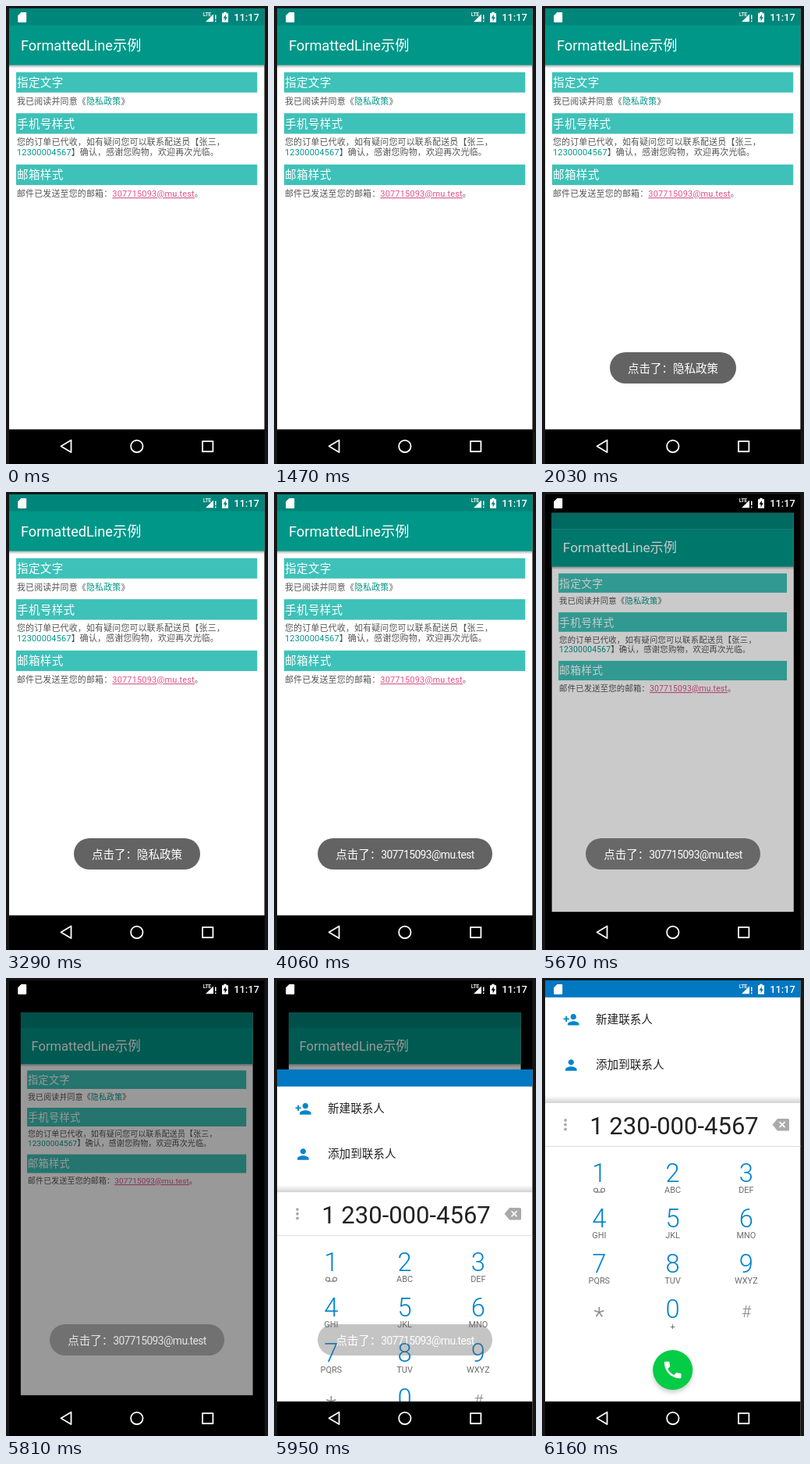
An HTML page for the animation above (6.44 s loop, 336x586 px).

```html
<!DOCTYPE html>
<html lang="zh-CN">
<head>
<meta charset="utf-8">
<title>Text styles</title>
<style>
  html, body { margin: 0; width: 100%; height: 100%; overflow: hidden; background: #161616; }
  svg { display: block; width: 336px; height: 586px; }
  text { font-family: Roboto, "Noto Sans CJK SC", "Noto Sans CJK", sans-serif; text-spacing-trim: space-all; white-space: pre; }
  .title { font-size: 18.2px; fill: #fff; }
  .heading { font-size: 14.58px; letter-spacing: .3px; fill: #fff; }
  .body { font-size: 10.93px; letter-spacing: .2px; fill: #555; }
  .link { fill: #009688; }
  .mail { fill: #db5288; text-decoration: underline .6px; text-underline-offset: 1px; text-decoration-skip-ink: none; }
  .toast text { font-size: 14.5px; fill: #fff; text-anchor: middle; }
  .toast rect { fill: #636363; }
  .toast .address { font-size: 13.8px; letter-spacing: -.55px; }
  .action { font-size: 14.58px; fill: #222; }
  .blue { fill: #0284cc; }
  .number { font-size: 31px; fill: #222; text-anchor: middle; }
  .digit { font-size: 32.8px; font-weight: 300; fill: #0284cc; text-anchor: middle; }
  .letters { font-size: 10.9px; fill: #6c6c6c; text-anchor: middle; }
  .symbol { font-weight: 300; fill: #888; text-anchor: middle; }
  .clock { font-size: 12.75px; font-weight: 500; fill: #fff; }
</style>
</head>
<body>
<svg viewBox="0 0 336 586">
  <defs>
    <linearGradient id="below" x2="0" y2="1">
      <stop stop-color="#000" stop-opacity=".3"/><stop offset="1" stop-color="#000" stop-opacity="0"/>
    </linearGradient>
    <linearGradient id="above" x2="0" y2="1">
      <stop stop-color="#000" stop-opacity="0"/><stop offset="1" stop-color="#000" stop-opacity=".18"/>
    </linearGradient>
    <filter id="soft" x="-30%" y="-30%" width="160%" height="160%"><feGaussianBlur stdDeviation="3"/></filter>
  </defs>
  <rect width="336" height="586" fill="#161616"/>
  <rect x="4" y="3" width="327.4" height="583"/>

  <g id="app">
    <rect x="4" y="3" width="327.4" height="538.8" fill="#fff"/>
    <rect x="4" y="3" width="327.4" height="22" fill="#00857a"/>
    <rect x="4" y="24.7" width="327.4" height="51" fill="#009788"/>
    <rect x="4" y="75.7" width="327.4" height="4" fill="url(#below)"/>
    <text class="title" x="19" y="56.5">FormattedLine示例</text>
    <g fill="#3ec1b8">
      <rect x="13" y="84.7" width="309.2" height="26"/>
      <rect x="13" y="137.2" width="309.2" height="26.3"/>
      <rect x="13" y="202.8" width="309.2" height="26.3"/>
    </g>
    <text class="heading" x="14" y="103">指定文字</text>
    <text class="heading" x="14" y="155.8">手机号样式</text>
    <text class="heading" x="14" y="221.2">邮箱样式</text>
    <text class="body" x="14" y="126">我已阅读并同意《<tspan class="link">隐私政策</tspan>》</text>
    <text class="body" x="14" y="178.3">您的订单已代收，如有疑问您可以联系配送员【张三，</text>
    <text class="body" x="14" y="191.4"><tspan class="link">12300004567</tspan>】确认，感谢您购物，欢迎再次光临。</text>
    <text class="body" x="14" y="244">邮件已发送至您的邮箱：<tspan class="mail">307715093@mu.test</tspan>。</text>
  </g>

  <g id="dialer">
    <rect x="4" y="3" width="327.4" height="583" fill="#fff"/>
    <rect x="4" y="3" width="327.4" height="21.8" fill="#0277c2"/>
    <path class="blue" transform="translate(26.6 42.4) scale(.911)" d="M15 12c2.21 0 4-1.79 4-4s-1.79-4-4-4-4 1.79-4 4 1.79 4 4 4zm-9-2V7H4v3H1v2h3v3h2v-3h3v-2H6zm9 4c-2.67 0-8 1.34-8 4v2h16v-2c0-2.66-5.33-4-8-4z"/>
    <path class="blue" transform="translate(26.4 100.5) scale(.911)" d="M12 12c2.21 0 4-1.79 4-4s-1.79-4-4-4-4 1.79-4 4 1.79 4 4 4zm0 2c-2.67 0-8 1.34-8 4v2h16v-2c0-2.66-5.33-4-8-4z"/>
    <text class="action" x="69" y="58">新建联系人</text>
    <text class="action" x="69" y="116">添加到联系人</text>
    <rect x="4" y="151" width="327.4" height="9" fill="url(#above)"/>
    <rect x="4" y="215" width="327.4" height="1" fill="#ddd"/>
    <g fill="#aaa">
      <circle cx="30" cy="182" r="1.9"/><circle cx="30" cy="187.7" r="1.9"/><circle cx="30" cy="193.4" r="1.9"/>
      <path d="M302 180h13.5q1.5 0 1.5 1.5v12.5q0 1.5-1.5 1.5H302L295.5 187.7z"/>
    </g>
    <path d="M304.5 184.2l7 7m0-7l-7 7" stroke="#fff" stroke-width="1.7"/>
    <text class="number" x="169.5" y="200">1 230-000-4567</text>
    <g id="keys"></g>
    <g fill="none" stroke="#777" stroke-width="1.1">
      <circle cx="69" cy="271.5" r="2.5"/><circle cx="78" cy="271.5" r="2.5"/><path d="M69 274h9"/>
    </g>
    <text class="symbol" x="73.3" y="443" font-size="32">*</text>
    <text class="symbol" x="262" y="434" font-size="21">#</text>
    <circle cx="167.7" cy="505" r="25" opacity=".22" filter="url(#soft)"/>
    <circle cx="167.7" cy="501.5" r="25.5" fill="#04cc46"/>
    <path fill="#fff" transform="translate(153.3 487.1) scale(1.2)" d="M6.62 10.79c1.44 2.83 3.76 5.14 6.59 6.59l2.2-2.2c.27-.27.67-.36 1.02-.24 1.12.37 2.33.57 3.57.57.55 0 1 .45 1 1V20c0 .55-.45 1-1 1-9.39 0-17-7.61-17-17 0-.55.45-1 1-1h3.5c.55 0 1 .45 1 1 0 1.25.2 2.45.57 3.57.11.35.03.74-.25 1.02l-2.2 2.2z"/>
  </g>

  <rect x="4" y="541.8" width="327.4" height="45"/>
  <g fill="none" stroke="#fff" stroke-width="1.8" stroke-linejoin="round">
    <path d="M83.5 555.5v15.5L70.5 563.3z"/>
    <circle cx="167.8" cy="563.3" r="7.7"/>
    <rect x="252" y="556.8" width="13.4" height="13.2"/>
  </g>

  <g fill="#fff">
    <path d="M19.5 8H25q1.2 0 1.2 1.2v10.6q0 1.2-1.2 1.2h-8.6q-1.2 0-1.2-1.2V12.3z"/>
    <text x="252.7" y="13.3" font-size="7" font-weight="500" letter-spacing="-.4">LTE</text>
    <path d="M256 20.3L266 10.5V20.3z"/>
    <path d="M268 11.5h1.5v5.5H268zM268 18.5h1.5v1.8H268z"/>
    <path fill-rule="evenodd" d="M279.3 7.8h3.4v1.4h2.3v11.6h-8V9.2h2.3zM281.8 10.8l-3.2 5h2v3.7l3.2-5.3h-2z"/>
  </g>
  <text class="clock" x="292.3" y="19">11:17</text>

  <g class="toast" id="policyToast">
    <rect x="87" y="443" width="162" height="40" rx="20"/>
    <text x="168" y="468.5">点击了：隐私政策</text>
  </g>
  <g class="toast" id="mailToast">
    <rect x="56" y="443" width="224" height="40" rx="20"/>
    <text x="168" y="468.5">点击了：<tspan class="address">307715093@mu.test</tspan></text>
  </g>
</svg>
<script>
const LOOP = 6440, FADE = 500;
const $ = id => document.getElementById(id);
const app = $('app'), dialer = $('dialer');
const policyToast = $('policyToast'), mailToast = $('mailToast');

const keys = [['1', ''], ['2', 'ABC'], ['3', 'DEF'], ['4', 'GHI'], ['5', 'JKL'], ['6', 'MNO'],
  ['7', 'PQRS'], ['8', 'TUV'], ['9', 'WXYZ'], null, ['0', '+']];
$('keys').innerHTML = keys.map((key, i) => {
  if (!key) return '';
  const x = 73.3 + i % 3 * 94.3, y = 260.5 + Math.floor(i / 3) * 58.2;
  return `<text class="digit" x="${x}" y="${y}">${key[0]}</text>` +
    `<text class="letters" x="${x}" y="${y + 14.5}">${key[1]}</text>`;
}).join('');

const progress = (t, start, length) => Math.min(1, Math.max(0, (t - start) / length));
const smooth = p => p * p * (3 - 2 * p);

// Toasts decelerate into view and accelerate out of it.
function fadeToast(toast, t, shown, hidden) {
  const enter = 1 - (1 - progress(t, shown, FADE)) ** 2;
  const leave = 1 - progress(t, hidden, FADE) ** 2;
  toast.setAttribute('opacity', enter * leave);
}

function draw(now) {
  const t = now % LOOP;
  fadeToast(policyToast, t, 1530, 3555);
  fadeToast(mailToast, t, 3555, 5555);

  const recede = smooth(progress(t, 5505, 300));
  const dim = smooth(progress(t, 5530, 275));
  app.setAttribute('opacity', 1 - .4 * dim);
  app.setAttribute('transform', `translate(168 454) scale(${1 - .091 * recede}) translate(-168 -454)`);

  const slide = (1 - progress(t, 5805, 500)) ** 5;
  dialer.setAttribute('transform', `translate(0 ${t < 6150 ? 641 * slide : 0})`);
}

const start = performance.now();
function tick() {
  draw(performance.now() - start);
  requestAnimationFrame(tick);
}
tick();
</script>
</body>
</html>
```
